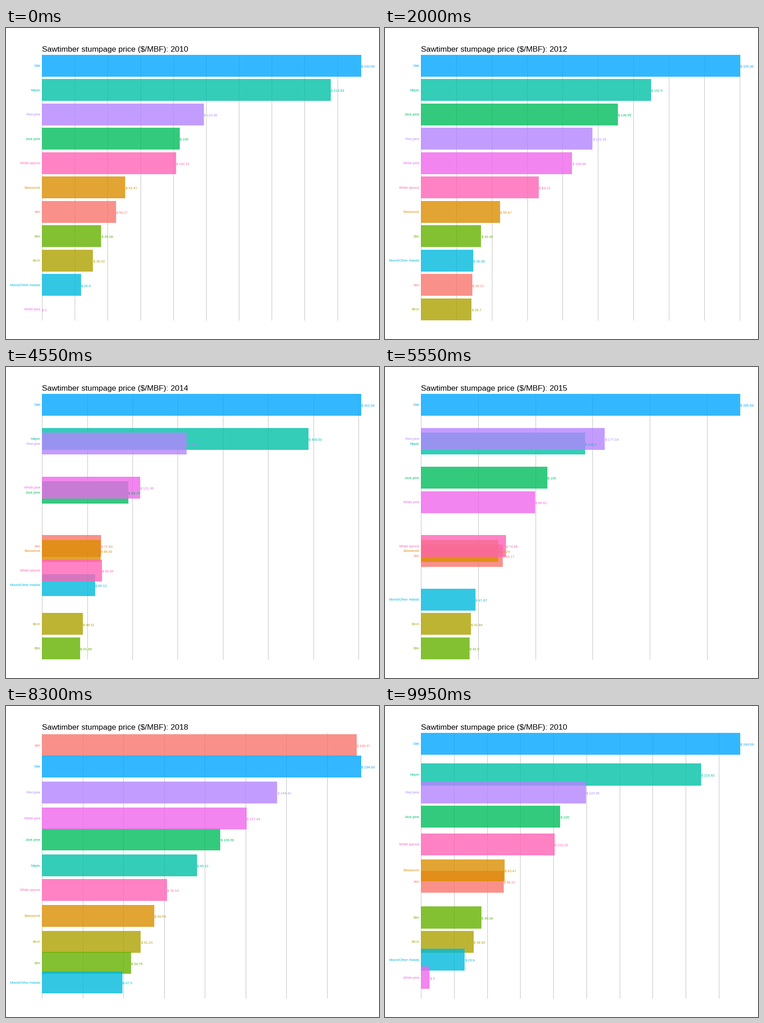
Animation of 820x683 px, one loop 10 s. Source, as a matplotlib script:

```python
import numpy as np
import matplotlib.pyplot as plt
from matplotlib.animation import FuncAnimation
from matplotlib.collections import LineCollection
from matplotlib.patches import Rectangle

W, H = 820, 683
DPI = 64                          # a power of two keeps the pixel size exact
LEFT, SPAN = 79.1, 701.7          # panel, in pixels
TOP, BOTTOM = 58.7, 642.0
STEP = (BOTTOM - TOP) / 10.9      # distance between ranks
BAR = 0.9 * STEP
FRAMES, PER_STATE = 200, 20

plt.rcParams["font.family"] = "Liberation Sans"

SPECIES = {
    "Ash": "#F8766D", "Basswood": "#DB8E00", "Birch": "#AEA200",
    "Elm": "#64B200", "Jack pine": "#00BD5C", "Maple": "#00C1A7",
    "Mixed/Other Hdwds": "#00BADE", "Oak": "#00A6FF", "Red pine": "#B385FF",
    "White pine": "#EF67EB", "White spruce": "#FF63B6",
}

# One row per year from 2010, columns in the order of SPECIES
PRICES = np.array([
    [56.27, 63.47, 38.92, 45.08, 105, 219.83, 29.8, 243.09, 123.36, 0, 102.15],
    [58.21, 56.64, 37.43, 39.25, 121.78, 191.32, 40.16, 234.15, 122.47, 96.35, 91.52],
    [36.12, 55.87, 35.7, 42.45, 138.95, 162.5, 36.88, 225.36, 121.15, 106.66, 83.12],
    [34.06, 54.44, 36.97, 41.41, 112, 166.65, 28.56, 274.54, 126.48, 112.79, 87.57],
    [72.83, 68.42, 46.51, 41.68, 88.75, 406.53, 66.12, 411.04, 148.13, 121.36, 60.34],
    [54.17, 59.24, 42.84, 42.5, 105, 126.7, 47.87, 265.54, 177.16, 88.92, 74.68],
    [97.23, 80.14, 45.02, 42.13, 118.75, 168.61, 46.95, 298.97, 135.92, 115.64, 73.38],
    [72.2, 104.38, 43, 39.77, 139.76, 153.04, 50.28, 195.16, 142.72, 82.28, 67.58],
    [196.37, 69.55, 61.23, 54.75, 109.56, 95.21, 47.3, 194.63, 144.41, 127.44, 76.14],
    [149.25, 59.72, 53.03, 53.46, 108.94, 95.53, 78.82, 214.38, 144.42, 98.56, 84.36],
])
RANKS = (-PRICES).argsort(axis=1).argsort(axis=1)


def pt(px):
    return px * 72 / DPI


fig = plt.figure(figsize=(W / DPI, H / DPI), dpi=DPI, facecolor="white")
ax = fig.add_axes([0, 0, 1, 1])
ax.set(xlim=(0, W), ylim=(H, 0))
ax.axis("off")

grid = LineCollection([], colors="#BEBEBE", linewidths=pt(1), zorder=1)
ax.add_collection(grid, autolim=False)
title = ax.text(LEFT, 52, "", fontsize=pt(17.33), color="black", va="baseline")

bars, names, labels = [], [], []
for name, color in SPECIES.items():
    bar = Rectangle((LEFT, 0), 0, BAR, facecolor=color, alpha=0.8,
                    linewidth=0, snap=True, zorder=2)
    bars.append(ax.add_patch(bar))
    style = dict(fontsize=pt(7.45), color=color, va="baseline")
    names.append(ax.text(75.4, 0, name, ha="right", zorder=3, **style))
    labels.append(ax.text(0, 0, "", ha="left", zorder=4, **style))


def timing(frame):
    """Current state, the next one and the linear progress between them."""
    state, k = divmod(frame % FRAMES, PER_STATE)
    hold = 5 if state else 4
    t = max(0, k - hold) / (PER_STATE - hold)
    return state, (state + 1) % len(PRICES), t


def draw(frame):
    a, b, t = timing(frame)
    prices = (1 - t) * PRICES[a] + t * PRICES[b]
    ranks = (1 - t) * RANKS[a] + t * RANKS[b]
    nearest = a if t < 0.5 else b

    top_price = prices.max()
    scale = SPAN / top_price
    gap = 25 if top_price < 271 else 50
    ticks = LEFT + scale * np.arange(0, top_price, gap)
    grid.set_segments([[(x, TOP), (x, BOTTOM)] for x in ticks])
    title.set_text(f"Sawtimber stumpage price (\\$/MBF): {2010 + nearest}")

    for i, (bar, name, label) in enumerate(zip(bars, names, labels)):
        y = TOP + BAR / 2 + STEP * ranks[i]
        width = scale * prices[i]
        bar.set_y(y - BAR / 2)
        bar.set_width(width)
        name.set_y(y + 2.4)
        label.set_position((LEFT + width + 0.3, y + 3.6))
        label.set_text(f"\\$ {PRICES[nearest, i]:g}")
    return [grid, title, *bars, *names, *labels]


anim = FuncAnimation(fig, draw, frames=FRAMES, interval=50,
                     repeat=True, repeat_delay=0, blit=False)
plt.show()
```
